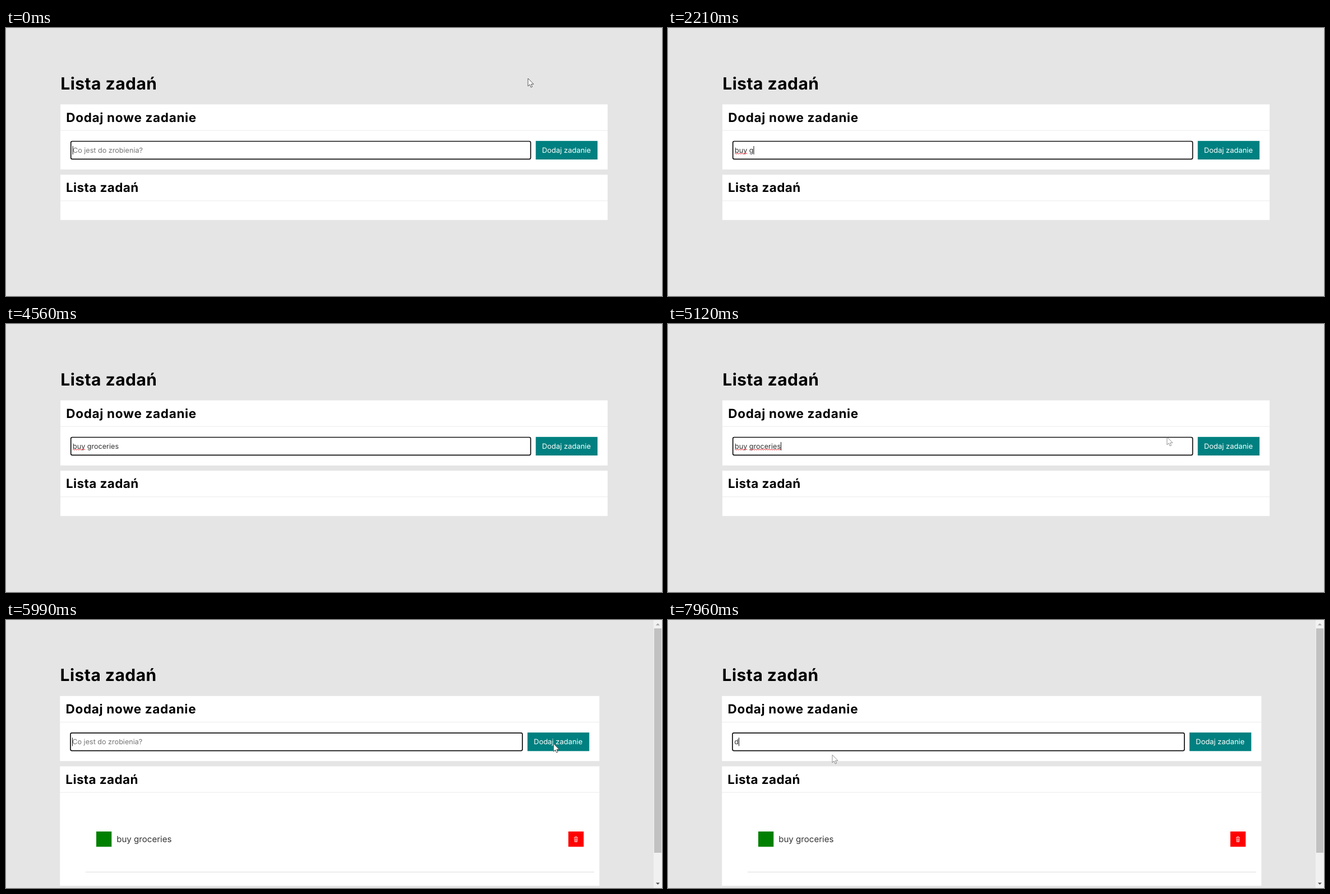
These frames come from a looping animation (1170 by 479 pixels, 8000 ms). An HTML page:

```html
<!DOCTYPE html>
<html lang="pl">
<head>
<meta charset="utf-8">
<title>Lista zadań</title>
<style>
  html, body { margin: 0; width: 100%; height: 100%; overflow: hidden; background: #e5e5e5; }
  svg { display: block; width: 1170px; height: 479px; }
  text {
    font-family: Inter, "Open Sans", sans-serif;
    font-optical-sizing: none;
    text-rendering: geometricPrecision;
    white-space: pre;
  }
  .h1 { font-size: 30px; font-weight: 700; letter-spacing: .015em; }
  .h2 { font-size: 22.5px; font-weight: 700; letter-spacing: .017em; }
  .wide { letter-spacing: .03em; }
  .field { font-size: 12.6px; }
  .btn { font-size: 12.95px; fill: #fff; }
  .item { font-size: 15.1px; fill: #333; }
  .card { fill: #fff; }
  .line { fill: #ececec; }
</style>
</head>
<body>
<svg viewBox="0 0 1170 479">
  <defs>
    <pattern id="wave" width="4" height="3" patternUnits="userSpaceOnUse" y="223">
      <path d="M-1 .2 L0 .7 L2 2.3 L4 .7 L5 .2" fill="none" stroke="#e0242c"/>
    </pattern>
  </defs>
  <rect width="1170" height="479" fill="#e5e5e5"/>
  <g id="page">
    <text class="h1" x="97.3" y="110">Lista zadań</text>
    <rect class="card" data-w="976" x="97" y="136.5" height="116.3"/>
    <rect class="line" data-w="976" x="97" y="182.7" height="1"/>
    <text class="h2 wide" x="107.3" y="168">Dodaj nowe zadanie</text>
    <rect id="box" data-w="820" x="115.7" y="202.5" height="31.8" rx="2.5" fill="#fff"/>
    <text id="value" class="field" x="119" y="222.5"></text>
    <rect id="under1" y="223" height="3" fill="url(#wave)"/>
    <rect id="under2" y="223" height="3" fill="url(#wave)"/>
    <rect id="caret" y="211" width="1" height="15" fill="#111"/>
    <g id="add">
      <rect x="944.8" y="201.8" width="110.2" height="33.2" fill="#008080"/>
      <text class="btn" x="956" y="222.5">Dodaj zadanie</text>
    </g>
    <rect id="list" class="card" data-w="976" x="97" y="262.2"/>
    <rect class="line" data-w="976" x="97" y="308.3" height="1"/>
    <text class="h2" x="107" y="293.3">Lista zadań</text>
  </g>
  <g id="task">
    <rect x="161" y="378" width="27.3" height="27.3" fill="#008000"/>
    <text class="item" x="197.2" y="397">buy groceries</text>
    <rect x="1003" y="378" width="27.3" height="27.3" fill="#f00"/>
    <g fill="none" stroke="#fff" stroke-opacity=".85" stroke-width=".9">
      <path d="M1013 388.5 H1020 M1015.3 388 V387.3 H1017.7 V388"/>
      <path d="M1013.8 389.5 L1014.3 396.6 H1018.7 L1019.2 389.5 M1015.6 390 V396 M1017.4 390 V396"/>
    </g>
    <rect x="142" y="450" width="907" height="1" fill="#ddd"/>
    <rect x="1155" width="15" height="479" fill="#f1f1f1"/>
    <rect x="1156" y="15" width="13" height="401" fill="#c1c1c1"/>
    <path d="M1159 9.5 L1162.5 6 L1166 9.5z" fill="#a3a3a3"/>
    <path d="M1159 469.5 L1162.5 473 L1166 469.5z" fill="#505050"/>
  </g>
  <path id="pointer" d="M0 0 V14 L3.2 11 L5.3 16 L7.7 15 L5.6 10.3 H10z" fill="#fff" stroke="#444" stroke-width=".9" stroke-linejoin="round"/>
</svg>
<script>
const $ = id => document.getElementById(id);
const LOOP = 8000, SPELL = 4890, BLUR = 5930, ADDED = 5990, BLINK = 530;

// Typing bursts: start, ms per key, keys ("<" deletes)
const bursts = [
  [1640, 130, 'buy '], [2210, 80, 'go'], [2850, 80, '<ro'],
  [3350, 128, 'ceries'], [7960, 80, 'd']
];
const keys = bursts.flatMap(([start, gap, word]) =>
  [...word].map((key, i) => ({ time: start + i * gap, key })));

// Pointer stops: time, x, y
const stops = [
  [130, 931, 90], [670, 933, -20], [SPELL - 1, 933, -20],
  [SPELL, 884, 191], [5120, 890, 202], [5600, 976.5, 221],
  [6510, 976.5, 221], [6900, 293, 220], [7070, 293, 241]
];

const set = (el, attrs) => { for (const k in attrs) el.setAttribute(k, attrs[k]); };
const show = (el, on) => set(el, { visibility: on ? 'visible' : 'hidden' });
const ease = p => p * p * (3 - 2 * p);
const value = $('value');

function typing(t) {
  let text = '', last = -100;
  if (t >= ADDED) last = ADDED;
  for (const { time, key } of keys) {
    if (time > t || (t >= ADDED && time < ADDED)) continue;
    text = key === '<' ? text.slice(0, -1) : text + key;
    last = time;
  }
  return { text, lit: Math.floor((t - last) / BLINK) % 2 === 0 };
}

function pointerAt(t) {
  const i = stops.findIndex(s => s[0] > t);
  if (i < 1) return stops.at(i).slice(1);
  const [t0, x0, y0] = stops[i - 1], [t1, x1, y1] = stops[i];
  const p = ease((t - t0) / (t1 - t0));
  return [x0 + (x1 - x0) * p, y0 + (y1 - y0) * p];
}

function underline(el, from, to, on) {
  show(el, on);
  if (on) set(el, {
    x: 119 + (from ? value.getSubStringLength(0, from) : 0),
    width: value.getSubStringLength(from, to - from)
  });
}

function draw(t) {
  const added = t >= ADDED, focused = t < BLUR || added;
  const { text, lit } = typing(t);

  set($('page'), { transform: added ? 'translate(-.7 -.7)' : '' });
  set($('add'), { transform: added ? 'translate(-14 0)' : '' });
  for (const el of document.querySelectorAll('[data-w]'))
    set(el, { width: el.dataset.w - (added ? 14 : 0) });
  set($('list'), { height: added ? 213.5 : 81 });
  show($('task'), added);

  set($('box'), {
    stroke: focused ? '#101010' : '#858585',
    'stroke-width': focused ? 1.7 : 1
  });
  value.textContent = text || 'Co jest do zrobienia?';
  set(value, { fill: text ? '#333' : '#757575' });
  set($('caret'), { x: text ? 119 + value.getComputedTextLength() : 118.7 });
  show($('caret'), focused && lit);
  underline($('under1'), 0, 3, focused && text.length > 3);
  underline($('under2'), 4, 13, focused && t >= SPELL && !added);

  const [x, y] = pointerAt(t);
  set($('pointer'), {
    transform: `translate(${x} ${y})`,
    opacity: y > 180 && x < 945 ? .65 : 1
  });
}

const start = performance.now();
function tick() {
  draw((performance.now() - start) % LOOP);
  requestAnimationFrame(tick);
}
tick();
</script>
</body>
</html>
```
